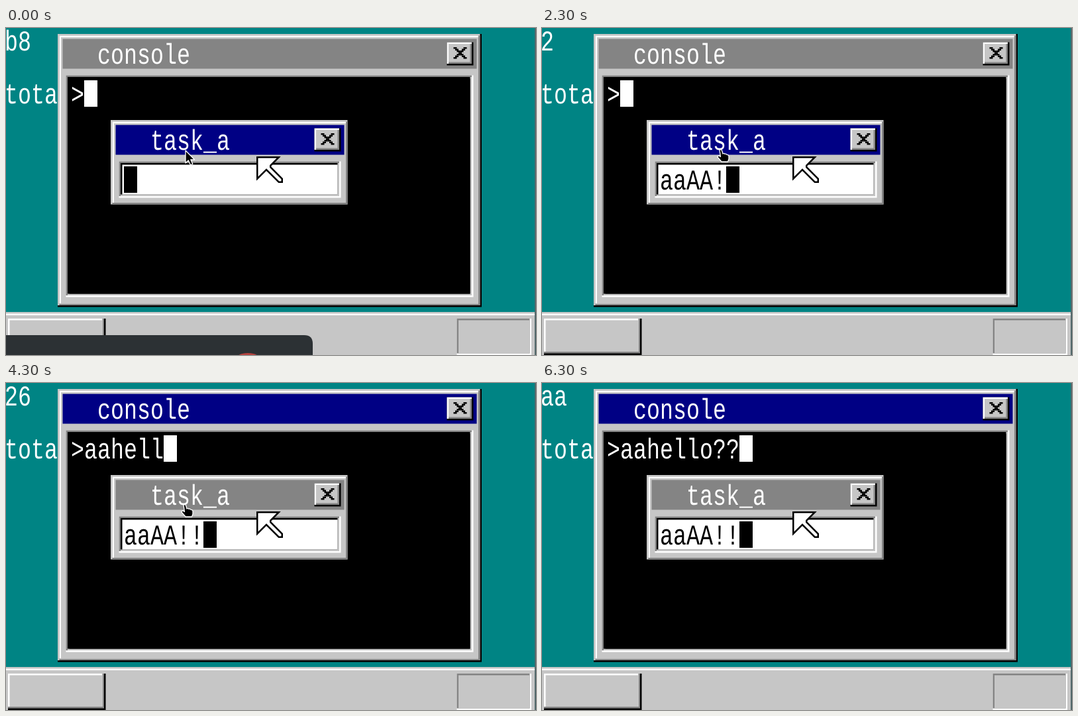
These frames come from a looping animation (800 by 494 pixels, 6.35 s). An HTML page:

```html
<!DOCTYPE html>
<html lang="en">
<head>
<meta charset="utf-8">
<title>Two windows</title>
<style>
html, body { margin: 0; width: 100%; height: 100%; overflow: hidden; background: #008484; }
svg { display: block; width: 800px; height: 494px; }
text {
  font: 13.333px "Liberation Mono", "Courier New", monospace;
  white-space: pre;
  text-rendering: geometricPrecision;
}
</style>
</head>
<body>
<svg id="stage" viewBox="0 0 800 494" xmlns="http://www.w3.org/2000/svg"></svg>
<script>
const LOOP = 6350, FOCUS = 2800;
const GREY = '#c6c6c6', DARK = '#848484', NAVY = '#000084', TEAL = '#008484';
const WHITE = '#fff', BLACK = '#000';

// time, key code shown in the corner, typed character
const KEYS = [
  [0, 'b8'], [900, '1e', 'a'], [950, '9e'], [1100, '1e', 'a'], [1150, '9e'],
  [1450, '2a'], [1550, '1e', 'A'], [1650, '9e'], [1750, '1e', 'A'], [1850, '9e'],
  [2000, 'aa'], [2150, '2a'], [2300, '2', '!'], [2350, '82'], [2550, '2', '!'],
  [2600, '82'], [2650, 'aa'], [2800, 'f'], [2900, '8f'],
  [3400, '1e', 'a'], [3450, '9e'], [3600, '1e', 'a'], [3650, '9e'],
  [3900, '23', 'h'], [3950, '12', 'e'], [4000, '92'], [4100, '26', 'l'], [4150, 'a6'],
  [4300, '26', 'l'], [4350, 'a6'], [4400, '18', 'o'], [4450, '98'], [4600, '2a'],
  [4750, '35', '?'], [4900, 'b5'], [5000, '35', '?'], [5050, 'b5'], [5750, 'aa']
];
const TASK_BLINK = [300, 800, 1300, 1850, 2350, 2800, 3300, 3900, 4400, 4850, 5350, 5900];
const CONSOLE_BLINK = [350, 850, 1350, 1900, 2400, 2900, 3350, 3950, 4450, 4900, 5400, 5950];

const stage = document.getElementById('stage');

function add(parent, tag, attrs) {
  const el = document.createElementNS('http://www.w3.org/2000/svg', tag);
  for (const k in attrs) el.setAttribute(k, attrs[k]);
  return parent.appendChild(el);
}
const group = (parent, transform) => add(parent, 'g', { transform });

// filled box with inclusive corners, in screen cells
const box = (g, fill, x0, y0, x1, y1) =>
  add(g, 'rect', { x: x0, y: y0, width: x1 - x0 + 1, height: y1 - y0 + 1, fill });

// tall 8 x 16 character cells
function label(g, x, y, fill, str) {
  const el = add(g, 'text', { transform: `translate(${x} ${y + 14}) scale(1 1.3)`, fill });
  el.textContent = str;
  return el;
}

function closeButton(g, x, y) {
  const b = group(g, `translate(${x} ${y})`);
  box(b, BLACK, 0, 0, 15, 13);
  box(b, WHITE, 0, 0, 14, 12);
  box(b, DARK, 1, 1, 14, 12);
  box(b, GREY, 1, 1, 13, 11);
  for (let i = 0; i < 7; i++) {
    const d = Math.min(i, 6 - i);
    box(b, BLACK, 4 + d, 3 + i, 5 + d, 3 + i);
    box(b, BLACK, 10 - d, 3 + i, 11 - d, 3 + i);
  }
}

function makeWindow(g, x, y, w, h, name, paper) {
  const win = group(g, `translate(${x} ${y})`);
  box(win, BLACK, 0, 0, w - 1, h - 1);
  box(win, GREY, 0, 0, w - 2, h - 2);
  box(win, DARK, 1, 1, w - 2, h - 2);
  box(win, WHITE, 1, 1, w - 3, h - 3);
  box(win, GREY, 2, 2, w - 3, h - 3);
  const bar = box(win, NAVY, 3, 3, w - 4, 20);
  label(win, 24, 4, WHITE, name);
  closeButton(win, w - 21, 5);

  const r = w - 8, b = h - 8 + (h > 100 ? -1 : 0);
  box(win, WHITE, 5, 25, r + 2, b + 2);
  box(win, DARK, 5, 25, r + 1, b + 1);
  box(win, GREY, 6, 26, r + 1, b + 1);
  box(win, BLACK, 6, 26, r, b);
  box(win, paper, 7, 27, r, b);

  const ink = paper === WHITE ? BLACK : WHITE;
  return {
    bar,
    cursor: box(win, ink, 8, 28, 15, 43),
    text: label(win, 8, 28, ink, '')
  };
}

box(stage, '#52686a', 0, 0, 800, 494);
const screen = group(stage, 'translate(-2 -1) scale(2.5)');
box(screen, TEAL, 0, 0, 319, 171);
box(screen, GREY, 0, 172, 319, 199);
box(screen, WHITE, 0, 173, 319, 173);

// task bar button
box(screen, BLACK, 2, 176, 60, 197);
box(screen, DARK, 2, 176, 59, 196);
box(screen, WHITE, 2, 176, 58, 195);
box(screen, GREY, 3, 177, 58, 195);

// clock recess
box(screen, WHITE, 273, 176, 317, 197);
box(screen, DARK, 273, 176, 316, 196);
box(screen, GREY, 274, 177, 316, 196);

const code = label(screen, 0, 0, WHITE, '');
label(screen, 0, 32, WHITE, 'tota');
const shell = makeWindow(screen, 32, 4, 256, 165, 'console', BLACK);
const task = makeWindow(screen, 64, 56, 144, 52, 'task_a', WHITE);

add(screen, 'path', {
  transform: 'translate(152 78)', fill: WHITE, stroke: BLACK,
  d: 'M.5 .5H13.5L8.5 5.5V6.5L15.5 13.5V15.5H13.5L6 8 .5 13.5Z'
});

const panel = group(stage, '');
add(panel, 'path', { d: 'M0 464H450Q463 464 463 477V494H0Z', fill: '#2c3134' });
add(panel, 'ellipse', { cx: 365, cy: 505, rx: 22, ry: 14, fill: '#b5433f' });

const pointerStyle = { fill: BLACK, stroke: WHITE, 'stroke-width': 1.3, 'stroke-linejoin': 'round' };
const arrow = add(stage, 'path', {
  ...pointerStyle, d: 'M0 0V19L4.3 15 7.5 22 10.8 20.5 7.8 13.8H13.5Z'
});
const hand = add(stage, 'path', {
  ...pointerStyle, transform: 'translate(264 183)',
  d: 'M4 1.5Q6 -.5 7.5 2L9 7Q11 5.5 12 7.5 14 6.5 15 8.5 17.5 8 18 10.5V15L16.5 19H7L1 12Q1 9.5 4 10.5L5.5 11.5Z'
});

const show = (el, on) => el.setAttribute('visibility', on ? 'visible' : 'hidden');
const isOn = (times, t) => times.filter(v => v <= t).length % 2 === 0;

function write(win, str, on) {
  win.text.textContent = str;
  win.cursor.setAttribute('x', 8 + 8 * str.length);
  show(win.cursor, on);
}

function draw(t) {
  t = Math.floor(t / 50) * 50;
  const past = KEYS.filter(k => k[0] <= t);
  const typed = inShell => past.filter(k => k[2] && (k[0] > FOCUS) === inShell).map(k => k[2]).join('');
  code.textContent = past[past.length - 1][1];
  write(task, typed(false), isOn(TASK_BLINK, t));
  write(shell, '>' + typed(true), isOn(CONSOLE_BLINK, t));

  const shellActive = t >= FOCUS;
  shell.bar.setAttribute('fill', shellActive ? NAVY : DARK);
  task.bar.setAttribute('fill', shellActive ? DARK : NAVY);

  panel.setAttribute('opacity', t < 150 ? 1 : t < 200 ? 0.65 : t < 300 ? 0.3 : 0);

  // the pointer leaves towards the lower right corner
  const leave = Math.max(0, (t - 6000) / 250);
  show(hand, t >= 150 && t < 6000);
  show(arrow, t < 150 || (t >= 6000 && t < 6250));
  arrow.setAttribute('transform', `translate(${271 + 530 * leave * leave} ${185 + 305 * leave * leave})`);
}

const start = performance.now();
function tick(now) {
  draw(Math.max(0, now - start) % LOOP);
  requestAnimationFrame(tick);
}
draw(0);
requestAnimationFrame(tick);
</script>
</body>
</html>
```
